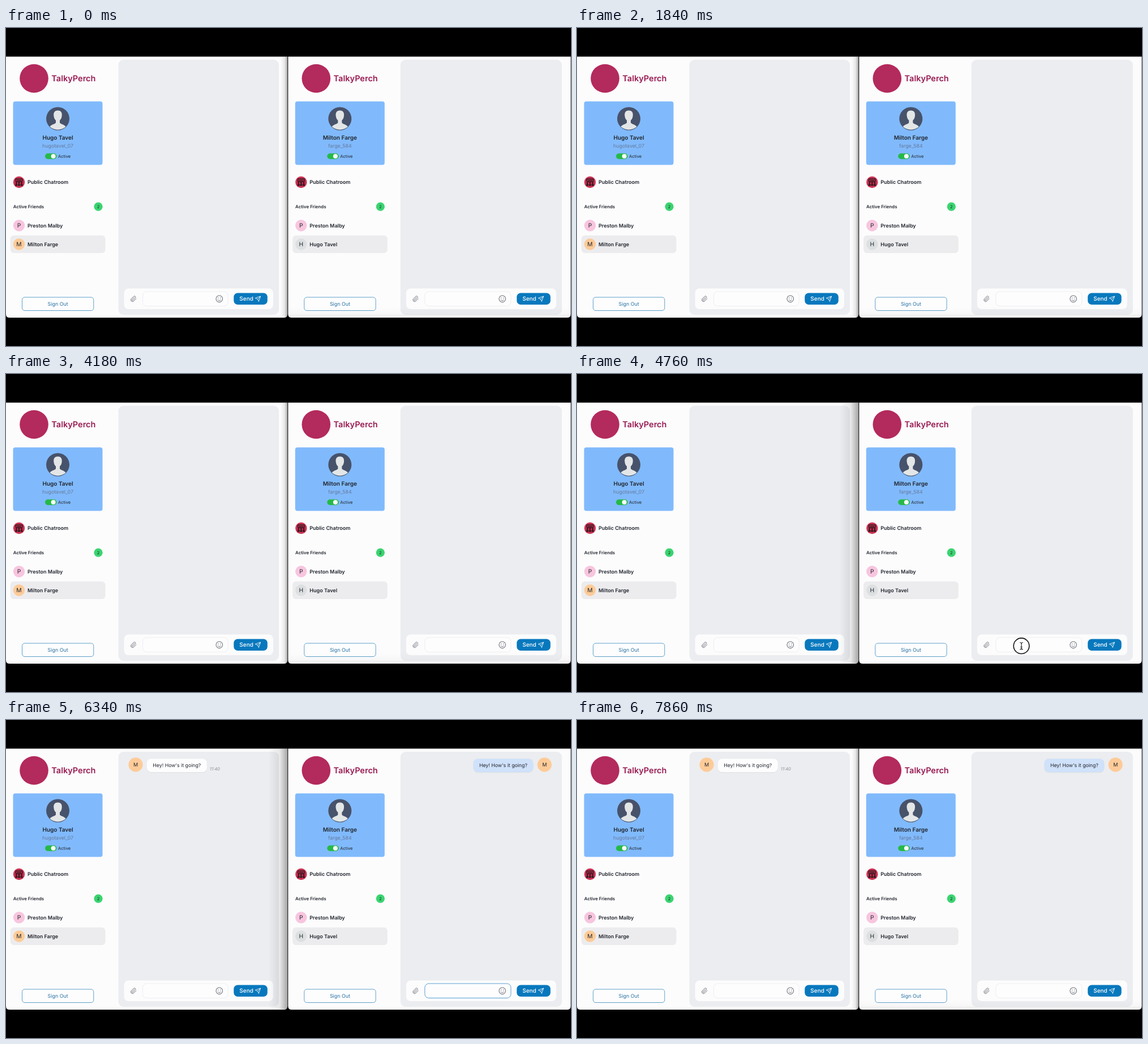
These frames come from a looping animation (998x561 px, 8000 ms). An HTML page:

```html
<!DOCTYPE html>
<html lang="en">
<head>
<meta charset="utf-8">
<title>Chat between two windows</title>
<style>
  html, body { margin: 0; width: 100%; height: 100%; overflow: hidden; background: #000; }
  svg { display: block; width: 998px; height: 561px; }
  text { font-family: Inter, "Open Sans", sans-serif; fill: #20242c; text-rendering: geometricPrecision; }
  .bold { font-weight: 600; }
  .mid { text-anchor: middle; }
  .line { fill: none; stroke-linecap: round; stroke-linejoin: round; }
</style>
</head>
<body>
<svg id="stage" viewBox="0 0 998 561"></svg>
<script>
const LOOP = 8000;
const MESSAGE = "Hey! How's it going?";
const PEACH = "#fdcb98", PINK = "#f8c5de";

const rect = (x, y, w, h, r, fill, more = "") =>
  `<rect x="${x}" y="${y}" width="${w}" height="${h}" rx="${r}" fill="${fill}" ${more}/>`;
const disc = (x, y, r, fill, more = "") => `<circle cx="${x}" cy="${y}" r="${r}" fill="${fill}" ${more}/>`;
const label = (x, y, size, str, cls = "", more = "") =>
  `<text x="${x}" y="${y}" font-size="${size}" class="${cls}" ${more}>${str}</text>`;
const icon = (x, y, scale, d, color) =>
  `<path class="line" transform="translate(${x} ${y}) scale(${scale})" d="${d}" stroke="${color}" stroke-width="1.9"/>`;

const CLIP = "M21.4 11l-9.2 9.2a6 6 0 0 1-8.4-8.4L13 2.6a4 4 0 0 1 5.6 5.6l-9.2 9.2a2 2 0 0 1-2.8-2.8L15 6";
const PLANE = "M22 2L11 13M22 2l-7 20-4-9-9-4z";

function profile(name, handle) {
  return rect(12.5, 129.5, 158, 112, 4, "#80bafc") +
    disc(91.5, 160, 20.5, "#47526b") +
    `<path fill="#e3e6e6" d="M91.5 145.5c-5.8 0-7.8 4.2-7.2 9.2.4 4 1.8 6.4 3.7 8v4.6c-1.6 2.4-7.8 3-10.6 6.6
      a20.5 20.5 0 0 0 28.2 0c-2.8-3.6-9-4.2-10.6-6.6v-4.6c1.9-1.6 3.3-4 3.7-8 .6-5-1.4-9.2-7.2-9.2z"/>` +
    label(91.5, 197, 10, name, "bold mid") +
    label(91.5, 210.5, 8.8, handle, "mid", 'style="fill:#66799b"') +
    rect(69, 221.2, 20.5, 10, 5, "#25b948") + disc(83.6, 226.2, 4, "#fff") +
    label(92, 228.8, 7.5, "Active");
}

function chatroom() {
  const people = [18.3, 23, 27.7].map(x =>
    disc(x, 273.6, 1.4, "#1c1218") + rect(x - 2, 275.4, 4, 2.8, 1, "#1c1218")).join("");
  return disc(23, 272, 10.2, "#c93252") +
    rect(17.2, 266.2, 11.6, 4.8, 1, "none", 'stroke="#1c1218" stroke-width="1.3"') +
    rect(19, 268, 8, 1.2, 0, "#1c1218") + people +
    label(38, 275.3, 9, "Public Chatroom", "bold");
}

const friend = (y, name, color) =>
  disc(23, y, 10.2, color) +
  label(23, y + 3.7, 10.3, name[0], "mid") +
  label(38, y + 3.2, 9, name, "bold");

// extra: how far the right-aligned parts of the chat area are pushed out
function composer(extra, id) {
  const x = 376.8 + extra;
  return rect(208.5, 459.5, 263.5 + extra, 36.5, 8, "#fcfcfd") +
    icon(219.2, 472, .5, CLIP, "#70747c") +
    rect(241.5, 465, 150.5 + extra, 25.5, 7, "#fdfdfe", `id="${id}" stroke="#edeef2"`) +
    disc(x, 477.8, 5.8, "none", 'stroke="#70747c" stroke-width="1.1"') +
    disc(x - 2, 476.2, .8, "#70747c") + disc(x + 2, 476.2, .8, "#70747c") +
    `<path class="line" d="M${x - 2.8} 479.4q2.8 3.2 5.6 0" stroke="#70747c"/>` +
    rect(402.3 + extra, 467.5, 59.5, 20.5, 7, "#0878bd") +
    label(412.3 + extra, 481.4, 10, "Send", "", 'font-weight="500" style="fill:#fff"') +
    icon(439.6 + extra, 472.6, .45, PLANE, "#fff");
}

function pane({ dx, width, extra, user, handle, other, color, field }) {
  return `<g transform="translate(${dx} 0)">` +
    `<path d="M0 50.5H${width}V505q0 6-6 6H6q-6 0-6-6z" fill="#fcfcfd"/>` +
    disc(49.5, 89, 25.3, "#b32a5c") +
    label(80.3, 94.3, 14.5, "TalkyPerch", "bold", 'style="fill:#981b52"') +
    profile(user, handle) + chatroom() +
    label(12.8, 317.9, 7.85, "Active Friends", "bold") +
    disc(163, 315.2, 7.6, "#3ad470") + label(163, 317.9, 7.5, "2", "mid") +
    friend(348.5, "Preston Malby", PINK) +
    rect(7.8, 366, 167.7, 31, 6, "#ececee") +
    friend(381.5, other, color) +
    rect(28.5, 475, 126.3, 23.5, 4.5, "#fdfdfe", 'stroke="#4f97c2" stroke-width=".9"') +
    label(91.6, 490, 8.9, "Sign Out", "mid", 'style="fill:#2470a0"') +
    rect(198.5, 56, 283.5 + extra, 450, 9, "#ecedf0") +
    composer(extra, field) + `</g>`;
}

const bubble = (x, fill, avatarX) =>
  rect(x, 69.2, 106, 24, 8, "#cfd2d6", 'opacity=".45"') +
  rect(x, 68.2, 106, 23.8, 8, fill) +
  label(x + 53, 83.2, 8.75, MESSAGE, "mid") +
  disc(avatarX, 78.8, 12.6, PEACH) + label(avatarX, 82, 9, "M", "mid");

const fade = (id, x2, y2, from, to) =>
  `<linearGradient id="${id}" x2="${x2}" y2="${y2}"><stop stop-opacity="${from}"/>
   <stop offset=".6" stop-opacity="${(from + to) / 4}"/><stop offset="1" stop-opacity="${to}"/></linearGradient>`;

const stage = document.getElementById("stage");
stage.innerHTML =
  `<defs>${fade("side", 1, 0, 0, .34)}${fade("base", 0, 1, 0, .07)}
   <clipPath id="screen"><rect y="50" width="998" height="461"/></clipPath></defs>` +
  rect(0, 0, 998, 561, 0, "#000") +
  pane({ dx: 0, width: 497.2, extra: 0, user: "Hugo Tavel", handle: "hugotavel_07",
         other: "Milton Farge", color: PEACH, field: "leftField" }) +
  pane({ dx: 498.3, width: 499.2, extra: 1.6, user: "Milton Farge", handle: "farge_584",
         other: "Hugo Tavel", color: "#dde0e1", field: "rightField" }) +
  `<g id="messages">` + bubble(248.8, "#fdfdfe", 229) +
    label(359.8, 89, 7.6, "11:40", "", 'font-style="italic" style="fill:#8b8d94"') +
    bubble(825.4, "#d0e1fa", 951.2) + `</g>` +
  label(749.5, 481.2, 8.75, "", "", 'id="typed"') +
  rect(485, 50.5, 12.2, 460, 0, "url(#side)", 'id="sideShadow"') +
  rect(498.3, 492, 499.2, 19, 5, "url(#base)", 'id="baseShadow"') +
  `<g clip-path="url(#screen)"><g id="pointer">` +
    disc(0, 0, 13.8, "#fff", 'id="ring" fill-opacity=".55" stroke="#111" stroke-width="1.6"') +
    `<path class="line" d="M-2.4 -6Q0 -6 0 -4Q0 -6 2.4 -6M0 -4V4M-2.4 6Q0 6 0 4Q0 6 2.4 6M-1.2 2H1.2"
      stroke="#111" stroke-width="1.1"/></g></g>`;

const part = id => document.getElementById(id);
const show = (id, on) => part(id).setAttribute("visibility", on ? "visible" : "hidden");
const set = (id, attrs) => Object.entries(attrs).forEach(([k, v]) => part(id).setAttribute(k, v));
const progress = (t, a, b) => Math.min(1, Math.max(0, (t - a) / (b - a)));

function draw(t) {
  const rightActive = t >= 4640 && t < 7160;
  const focused = t >= 4800 && t < 7160;
  const sent = t >= 6200;

  const shadow = rightActive ? 34 : 12.2;
  set("sideShadow", { x: 497.2 - shadow, width: shadow });
  show("baseShadow", !rightActive);
  set("rightField", { stroke: focused ? "#5a9fd0" : "#edeef2" });

  // typing: first word, a pause, then the rest
  const letters = Math.floor(5 * progress(t, 4900, 5220) + 15 * progress(t, 5460, 6120));
  part("typed").textContent = sent ? "" : MESSAGE.slice(0, letters);
  show("messages", sent);

  const glide = 1 - (1 - progress(t, 4400, 4640)) ** 3;
  set("pointer", { transform: `translate(${800 - 15 * glide} ${520 - 40.3 * glide})` });
  show("pointer", t >= 4400 && t < 4900);
  show("ring", t >= 4640 && t < 4820);
}

function tick() {
  draw(performance.now() % LOOP);
  requestAnimationFrame(tick);
}
tick();
</script>
</body>
</html>
```
